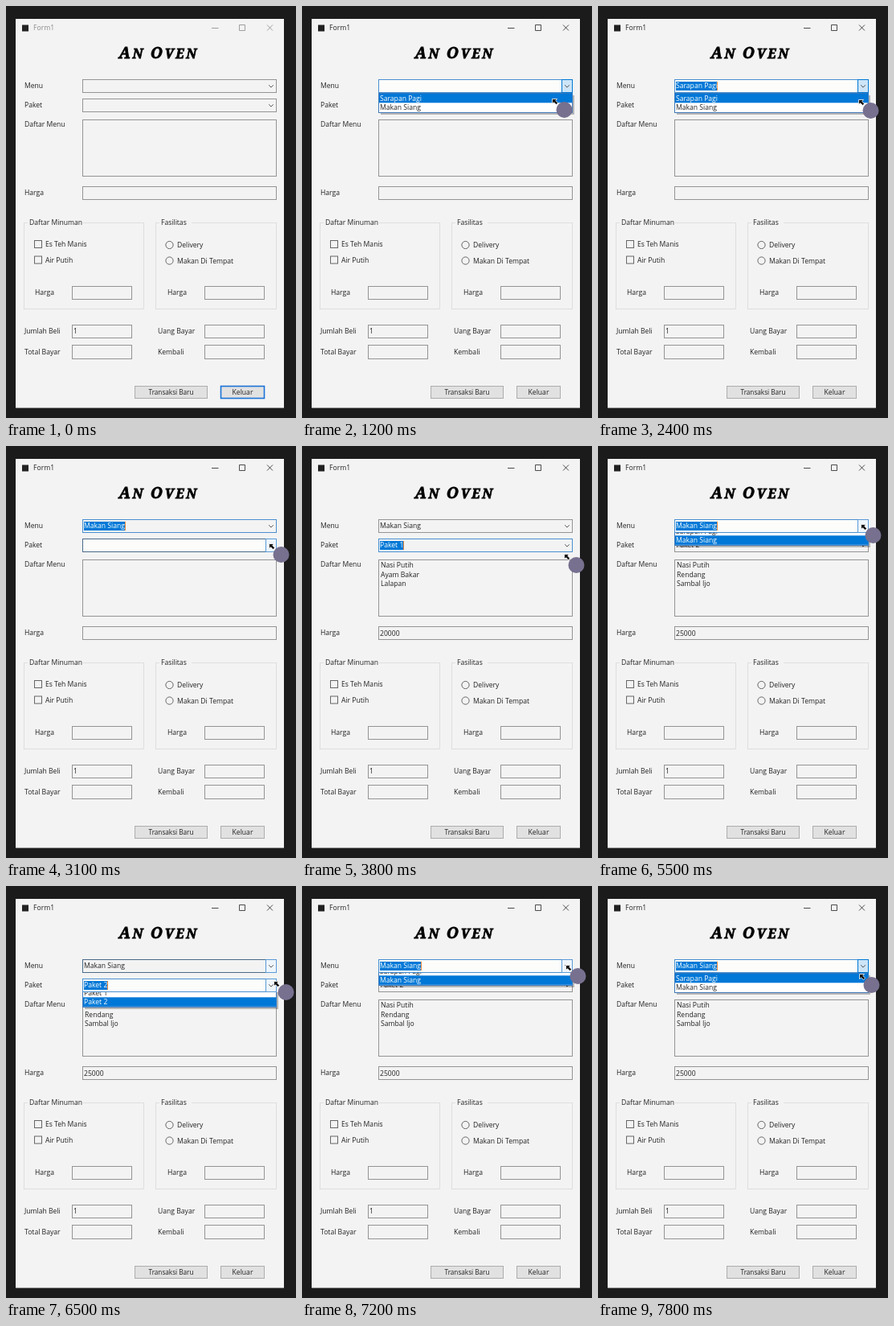
Recreate the animation shown at these times as an HTML page. Size 361 by 512 pixels, loop 8000 ms.

```html
<!DOCTYPE html>
<html lang="id">
<head>
<meta charset="utf-8">
<style>
html, body { margin: 0; width: 100%; height: 100%; overflow: hidden; background: #1b1b1b; }
svg { display: block; width: 361px; height: 512px; }
text { font: 8.6px "Open Sans", "Noto Sans", sans-serif; fill: #222; }
.title { font: italic 900 16px "Noto Serif", serif; letter-spacing: 2.7px; fill: #000; stroke: #000; stroke-width: .8px; }
.title .cap { font-size: 19px; }
.small { font-size: 8.2px; }
</style>
</head>
<body>
<svg viewBox="0 0 361 512">
  <defs>
    <clipPath id="below0"><rect x="90" y="108" width="260" height="60"/></clipPath>
    <clipPath id="below1"><rect x="90" y="132" width="260" height="60"/></clipPath>
  </defs>
  <g id="form"></g>
  <g id="live"></g>
</svg>
<script>
const LOOP = 8000, BLUE = '#0078d7', FACE = '#f3f3f3', EDGE = '#949494';
const form = document.getElementById('form');
const live = document.getElementById('live');

const text = (x, mid, s, attrs = '') => `<text x="${x}" y="${mid + 3}" ${attrs}>${s}</text>`;
const rect = (x, y, w, h, fill, stroke = 'none', attrs = '') =>
  `<rect x="${x}" y="${y}" width="${w}" height="${h}" fill="${fill}" stroke="${stroke}" ${attrs}/>`;
const path = (d, stroke, attrs = 'fill="none"') => `<path d="${d}" stroke="${stroke}" ${attrs}/>`;
const field = (x, y, w, h = 16) => rect(x + .5, y + .5, w, h, FACE, EDGE);
const group = (x, w, name, gap) =>
  rect(x + .5, 269.5, w, 107, 'none', '#dedede') + rect(x + 5, 267, gap, 5, FACE) + text(x + 7, 269, name);
const check = (y, name) => rect(35.5, y - 4.5, 9, 9, FACE, '#666') + text(49, y, name);
const radio = (y, name) =>
  `<circle cx="203.5" cy="${y}" r="4.6" fill="${FACE}" stroke="#666"/>` + text(213, y, name);

form.innerHTML = [
  rect(12, 16, 334, 483.5, FACE),
  rect(20, 23.5, 8, 8, '#222'),
  `<text class="title" x="190" y="65" text-anchor="middle"><tspan class="cap">A</tspan>N <tspan class="cap">O</tspan>VEN</text>`,
  text(23, 99, 'Menu'), text(23, 123, 'Paket'), text(23, 146.5, 'Daftar Menu'), text(23, 232, 'Harga'),
  field(95, 141, 241, 70), field(95, 224, 241),
  group(22, 149, 'Daftar Minuman', 69), group(186, 150, 'Fasilitas', 40),
  check(296, 'Es Teh Manis'), check(315.5, 'Air Putih'),
  radio(297, 'Delivery'), radio(316.5, 'Makan Di Tempat'),
  text(36, 356, 'Harga'), field(82, 348, 74), text(201, 356, 'Harga'), field(247, 348, 74),
  text(23, 404, 'Jumlah Beli'), field(82, 396, 74), text(84, 404, '1'),
  text(189, 404, 'Uang Bayar'), field(247, 396, 74),
  text(23, 430, 'Total Bayar'), field(82, 421, 74, 17),
  text(189, 430, 'Kembali'), field(247, 421, 74, 17),
  rect(160.5, 472.5, 90, 15, '#e1e1e1', '#adadad'),
  text(205.5, 480, 'Transaksi Baru', 'text-anchor="middle" class="small"')
].join('');

const combos = [
  { y: 91, rows: ['Sarapan Pagi', 'Makan Siang'] },
  { y: 115, rows: ['Paket 1', 'Paket 2'] }
];
const meals = [
  { price: 20000, dishes: ['Nasi Putih', 'Ayam Bakar', 'Lalapan'] },
  { price: 25000, dishes: ['Nasi Putih', 'Rendang', 'Sambal Ijo'] }
];

// hot is a bit mask of combos; slide is how far the list still has to drop
const start = { active: 0, hot: 0, focus: -1, open: -1, row: -1, slide: 0, menu: -1, paket: -1, caret: 1 };
const steps = [
  [100, { active: 1 }],
  [800, { hot: 1 }],
  [900, { focus: 0, open: 0, slide: 9 }],
  [1000, { slide: 0 }],
  [1100, { row: 0 }],
  [1400, { menu: 0, open: -1, hot: 0 }],
  [1800, { hot: 1 }],
  [1900, { open: 0, slide: 9 }],
  [2000, { slide: 0 }],
  [2600, { row: 1 }],
  [2700, { caret: 0 }],
  [2900, { menu: 1, open: -1, hot: 0, caret: 1 }],
  [3100, { hot: 2 }],
  [3300, { focus: 1, open: 1, row: -1, slide: 9 }],
  [3400, { slide: 0 }],
  [3500, { row: 0 }],
  [3800, { paket: 0, open: -1, hot: 0 }],
  [4200, { hot: 2 }],
  [4300, { open: 1, slide: 9 }],
  [4400, { slide: 0 }],
  [4800, { row: 1 }],
  [5100, { paket: 1, open: -1, hot: 0 }],
  [5400, { hot: 1 }],
  [5500, { focus: 0, open: 0, slide: 9 }],
  [5600, { slide: 0 }],
  [6000, { open: -1 }],
  [6300, { hot: 3 }],
  [6500, { focus: 1, open: 1, slide: 6 }],
  [6600, { slide: 0 }],
  [6900, { open: -1, hot: 0 }],
  [7100, { hot: 1 }],
  [7200, { focus: 0, open: 0, slide: 9 }],
  [7300, { slide: 0 }],
  [7600, { row: 0 }]
];

// pointer keys: time, x, y
const track = [
  [100, 352, 330], [800, 325, 98], [900, 320, 100], [1000, 311, 112], [1200, 311, 115],
  [1300, 311, 115], [1600, 315, 97], [1700, 315, 97], [1800, 325, 97], [2100, 325, 98],
  [2400, 324, 116], [2700, 318, 123], [2800, 318, 123], [3100, 327, 121], [3300, 326, 120],
  [3600, 326, 134], [3800, 326, 134], [4100, 334, 122], [4300, 328, 121], [4600, 325, 134],
  [4900, 325, 147], [5000, 325, 147], [5400, 327, 97], [5500, 327, 97], [5700, 326, 122],
  [6000, 326, 122], [6300, 332, 121], [6500, 333, 118], [6800, 327, 134], [6900, 327, 134],
  [7200, 328, 98], [7400, 328, 98], [7800, 325, 109], [LOOP, 325, 109]
];

function pointer(t) {
  const i = track.findIndex(k => k[0] > t);
  if (i < 1) return '';
  const [a, b] = [track[i - 1], track[i]];
  const p = (t - a[0]) / (b[0] - a[0]);
  const x = a[1] + (b[1] - a[1]) * p, y = a[2] + (b[2] - a[2]) * p;
  return `<g transform="translate(${x} ${y})"><circle cx="15.5" cy="14" r="10" fill="#77708f"/>` +
    path('M.5 .5H6.5L4.8 2.5L7.5 5.5L5.5 7.5L2.5 4.8L.5 6.5Z', '#fff', 'fill="#111" stroke-width=".8"') + '</g>';
}

function combo(i, s) {
  const { y, rows } = combos[i];
  const hot = s.hot >> i & 1, focus = s.focus === i;
  const pressed = s.open === i && !s.slide;
  const value = rows[i ? s.paket : s.menu];
  const fill = hot && (focus || !value) ? '#fcfcfa' : FACE;
  let out = rect(95.5, y + .5, 241, 16, fill, focus ? '#4a8fd0' : hot ? '#4a6a88' : EDGE);
  if (hot) out += rect(323.5, y + .5, 13, 16, pressed ? '#cce4f7' : '#eef5fb', pressed ? BLUE : '#5a9bd8');
  out += path(`M327.2 ${y + 7.3}l2.8 2.8l2.8 -2.8`, '#555');
  if (value) {
    const w = value.length > 8 ? 51 : 29;
    if (focus) out += rect(97, y + 3, w, 11, BLUE);
    if (focus && s.caret) out += rect(97 + w, y + 3, 1, 11, '#f08a3c');
    out += text(97, y + 8.3, value, focus ? 'style="fill:#fff"' : '');
  }
  return out;
}

function dropdown(s) {
  if (s.open < 0) return '';
  const { y, rows } = combos[s.open], top = y + 17;
  const items = rows.map((name, i) => {
    const on = i === s.row;
    return (on ? rect(96, top + .8 + i * 11.5, 240.5, 11.5, BLUE) : '') +
      text(97, top + 6.8 + i * 11.5, name, on ? 'style="fill:#fff"' : '');
  }).join('');
  return `<g clip-path="url(#below${s.open})"><g transform="translate(0 ${-s.slide})">` +
    rect(98, top + 3, 241, 24, '#000', 'none', 'opacity=".25"') +
    rect(95.5, top + .5, 241, 24, '#fff', '#3f78b8') + items + '</g></g>';
}

function chrome(s) {
  const ink = s.active ? '#222' : '#8a8a8a';
  return text(34, 27.3, 'Form1', `style="fill:${ink}"`) +
    path('M256 27.5h8.5M290.5 23.5h7v7h-7zM325 23.5l7 7M332 23.5l-7 7', ink, 'fill="none" stroke-width=".8"') +
    rect(267.5, 472.5, 54, 15, '#e1e1e1', s.focus < 0 ? '#1a72d8' : '#adadad', `stroke-width="${s.focus < 0 ? 1.6 : 1}"`) +
    text(294.5, 480, 'Keluar', 'text-anchor="middle"');
}

function draw(t) {
  const s = { ...start };
  for (const [at, change] of steps) if (at <= t) Object.assign(s, change);
  const meal = meals[s.paket];
  live.innerHTML = chrome(s) + combo(0, s) + combo(1, s) +
    (meal ? meal.dishes.map((d, i) => text(98, 148 + i * 11.5, d)).join('') + text(97, 232.5, meal.price) : '') +
    dropdown(s) + pointer(t);
}

let shown = -1;
function frame() {
  const t = Math.floor(performance.now() % LOOP / 100) * 100;
  if (t !== shown) draw(shown = t);
  requestAnimationFrame(frame);
}
frame();
</script>
</body>
</html>
```
